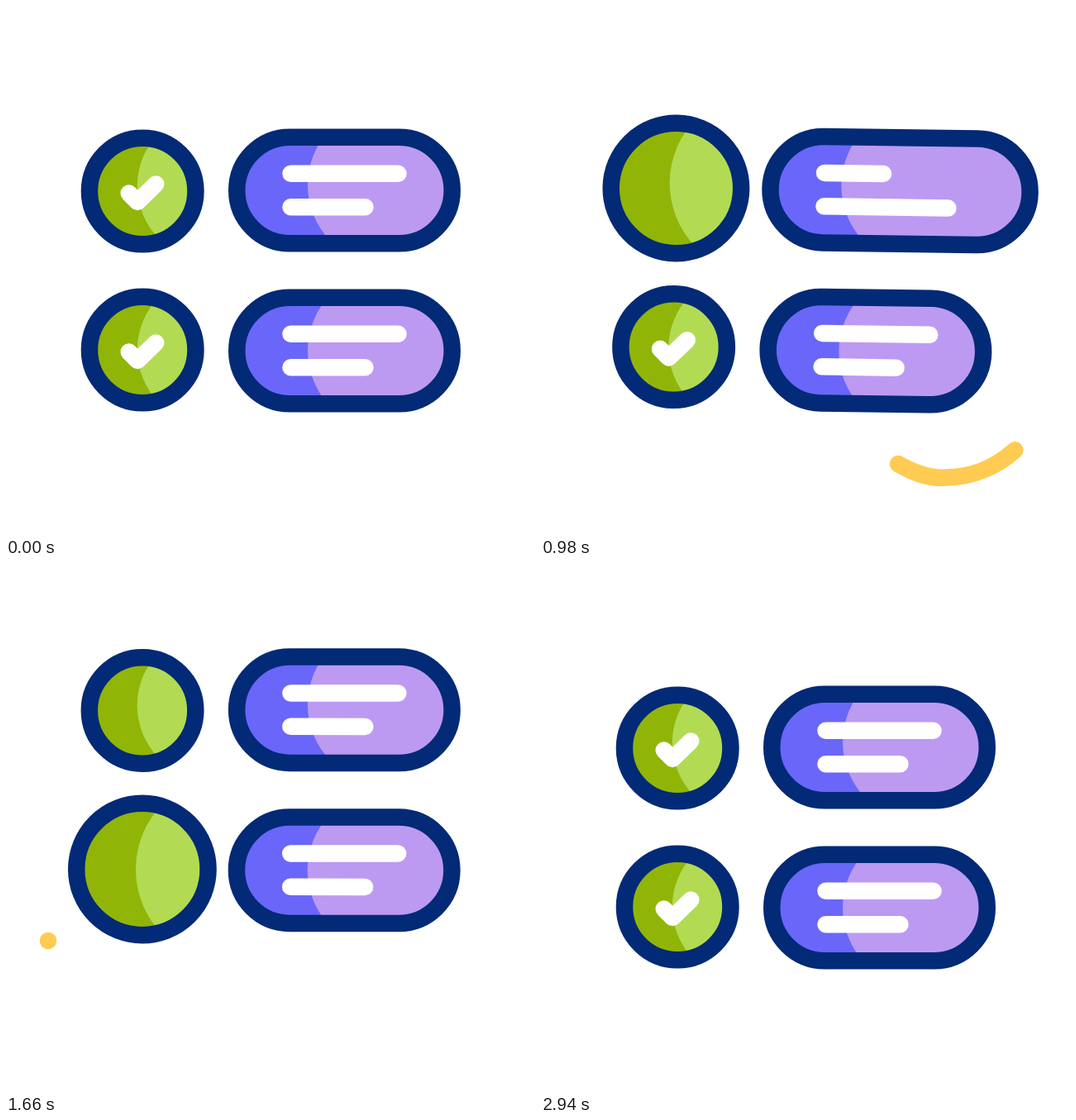
These frames come from a looping animation (640 by 640 pixels, 3120 ms). An HTML page with a canvas:

```html
<!DOCTYPE html>
<html lang="en">
<head>
<meta charset="utf-8">
<title>Checklist</title>
<style>
html, body { margin: 0; width: 100%; height: 100%; overflow: hidden; background: #fff; }
canvas { display: block; width: 640px; height: 640px; }
</style>
</head>
<body>
<canvas width="640" height="640"></canvas>
<script>
const ctx = document.querySelector('canvas').getContext('2d');
const LOOP = 3120, STROKE = 20.5;
const NAVY = '#032a76', YELLOW = '#ffcb52';

// Value at time t along [time, value] keys, eased in and out between them.
function track(t, keys) {
  if (t <= keys[0][0]) return keys[0][1];
  for (let i = 1; i < keys.length; i++) {
    const [t0, v0] = keys[i - 1], [t1, v1] = keys[i];
    if (t < t1) return v0 + (v1 - v0) * (1 - Math.cos(Math.PI * (t - t0) / (t1 - t0))) / 2;
  }
  return keys[keys.length - 1][1];
}
const ramp = (t, [start, end]) => track(t, [[start, 0], [end, 1]]);
// Goes 0 to 1, holds, and returns to 0.
const pulse = (t, [a, b, c, d]) => track(t, [[a, 0], [b, 1], [c, 1], [d, 0]]);

function makePath(d) {
  const el = document.createElementNS('http://www.w3.org/2000/svg', 'path');
  el.setAttribute('d', d);
  return { shape: new Path2D(d), length: el.getTotalLength() };
}

function strokeTrim({ shape, length }, from, to, color) {
  if (to <= from) return;
  ctx.save();
  ctx.strokeStyle = color;
  ctx.lineWidth = STROKE;
  ctx.setLineDash([Math.max((to - from) * length, 0.01), 9999]);
  ctx.lineDashOffset = -from * length;
  ctx.stroke(shape);
  ctx.restore();
}

const check = makePath('M-16.5 2.5L-6 13L16 -8.5');

const swooshes = [
  { path: 'M612 385Q619 410 619.5 435C618 509 560 571 488 570.5C467 572 448 563 432 554',
    lead: [296, 946], tail: [625, 1319] },
  { path: 'M51 457C68 515 112 553 172 563C208 569 243 565 275 556',
    lead: [1660, 2074], tail: [1890, 2550] },
  { path: 'M350 92C400 74 460 67 519 70',
    lead: [2480, 2760], tail: [2600, 2890] }
].map(s => ({ ...s, path: makePath(s.path) }));

// lightY is the height of the centre of the bright area's curved edge.
const rows = [
  { circleY: 224, pillY: 223, lightY: -6.3,
    grow: [400, 680, 940, 1200], erase: [310, 768], draw: [1890, 2220],
    stretch: [440, 720, 923, 1360], first: [480, 740, 1008, 1256], second: [620, 900, 979, 1333] },
  { circleY: 416, pillY: 417, lightY: 0,
    grow: [1320, 1600, 2160, 2440], erase: [1142, 1602], draw: [2290, 2620],
    stretch: [1755, 2035, 2193, 2630], first: [1800, 2086, 2278, 2526], second: [1870, 2150, 2249, 2603] }
];

// Two-tone shape with a dark outline.
function badge(outline, light, dark, bright) {
  ctx.fillStyle = dark;
  ctx.fill(outline);
  ctx.save();
  ctx.clip(outline);
  ctx.fillStyle = bright;
  ctx.fill(light);
  ctx.restore();
  ctx.strokeStyle = NAVY;
  ctx.lineWidth = STROKE;
  ctx.stroke(outline);
}

function drawCircle(t, row) {
  const scale = 1 + 0.24 * pulse(t, row.grow);
  const outline = new Path2D(), light = new Path2D();
  outline.arc(0, 0, 64.25 * scale, 0, 7);
  light.arc(84 * scale, row.lightY * scale, 90.4 * scale, 0, 7);
  ctx.save();
  ctx.translate(165.2, row.circleY);
  badge(outline, light, '#91b507', '#b2db53');
  strokeTrim(check, ramp(t, row.erase), 1, '#fff');
  strokeTrim(check, 0, ramp(t, row.draw), '#fff');
  ctx.restore();
}

function drawLine(y, length) {
  ctx.beginPath();
  ctx.moveTo(344.5, y);
  ctx.lineTo(344.5 + length, y);
  ctx.strokeStyle = '#fff';
  ctx.lineWidth = STROKE;
  ctx.stroke();
}

function drawPill(t, row) {
  const outline = new Path2D(), light = new Path2D();
  outline.roundRect(279.25, -64.25, 260.5 + 56 * pulse(t, row.stretch), 128.5, 64.25);
  light.arc(462, row.lightY, 97, 0, 7);
  light.rect(400, -70, 240, 140);
  ctx.save();
  ctx.translate(0, row.pillY);
  badge(outline, light, '#6a66f9', '#bc9af2');
  drawLine(-20.2, 130 - 59 * pulse(t, row.first));
  drawLine(20.2, 90 + 60 * pulse(t, row.second));
  ctx.restore();
}

function draw(t) {
  ctx.clearRect(0, 0, 640, 640);
  ctx.lineCap = ctx.lineJoin = 'round';

  const lift = track(t, [[150, 0], [680, -50.5], [1150, 18.6], [1770, -50.5], [2290, 0]]);
  const tilt = track(t, [[150, 0], [700, 2.8], [1400, -2.85], [1930, 3.1], [2510, 0]]);
  ctx.save();
  ctx.translate(320 - 3.8 * tilt, 320 + lift);
  ctx.rotate(tilt * Math.PI / 180);
  ctx.translate(-320, -320);
  for (const row of rows) {
    drawPill(t, row);
    drawCircle(t, row);
  }
  ctx.restore();

  for (const { path, lead, tail } of swooshes) {
    strokeTrim(path, ramp(t, tail), ramp(t, lead), YELLOW);
  }
}

const start = performance.now();
function frame() {
  draw((performance.now() - start) % LOOP);
  requestAnimationFrame(frame);
}
frame();
</script>
</body>
</html>
```
